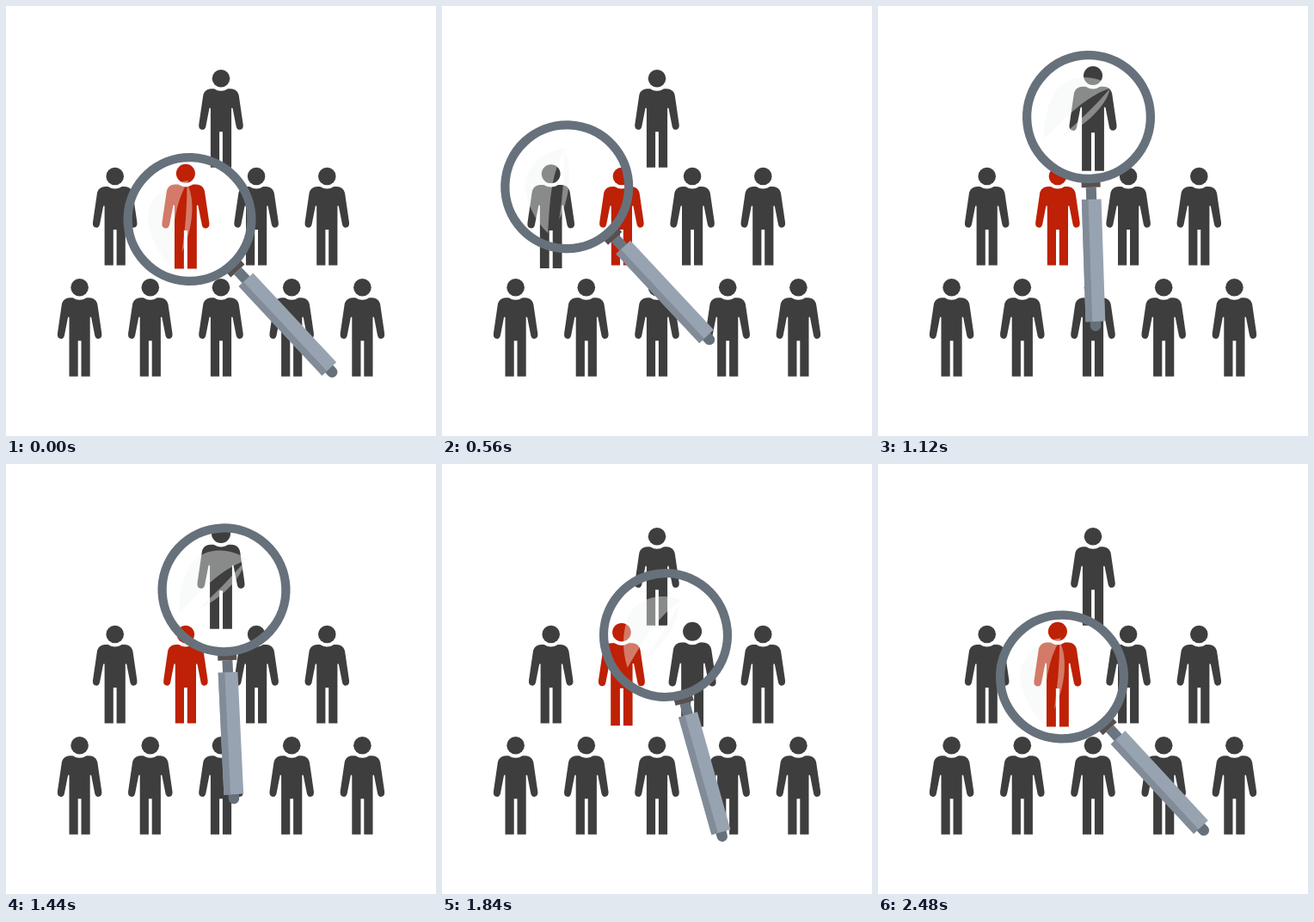
An HTML page for the animation above (2.52 s loop, 500 by 500 pixels).

```html
<!DOCTYPE html>
<html lang="en">
<head>
<meta charset="utf-8">
<title>Search</title>
<style>
html, body { margin: 0; width: 100%; height: 100%; overflow: hidden; background: #fff; }
svg { display: block; width: 100vw; height: 100vh; }
</style>
</head>
<body>
<svg viewBox="0 0 500 500">
  <defs>
    <g id="person">
      <circle r="10.3"/>
      <path d="M-8 12Q0 17 8 12H11.5C17 12.2 20 15.5 20.8 20L25.7 53.5Q26.3 58.8 22.4 59.6Q18.7 60.2 17.7 56L13.5 34.5H12.1V103.6H1.9V62H-1.9V103.6H-12.1V34.5H-13.5L-17.7 56Q-18.7 60.2-22.4 59.6Q-26.3 58.8-25.7 53.5L-20.8 20C-20 15.5-17 12.2-11.5 12Z"/>
    </g>
  </defs>
  <g id="crowd" fill="#3e3e3e"></g>
  <g id="lens">
    <g fill="#f1f5f3" fill-opacity=".42" transform="rotate(-47)">
      <path d="M-1-45C-30-42-49-22-49 0C-46 20-38 38-22 54C-20 16-18-20-1-45Z"/>
      <path d="M-3-41C7-24 4 12-9 38C-5 12-3-14-3-41Z"/>
    </g>
    <path fill="#6b757f" d="M82-6H98V6H82Z"/>
    <path fill="#574f50" d="M75-11H82V11H75Z"/>
    <path fill="#66707a" d="M236-6.2H243A6.2 6.2 0 0 1 243 6.2H236Z"/>
    <path fill="#98a3b2" d="M96-11.4H238V11.4H96Z"/>
    <path fill="#828c98" d="M96 3.7H238V11.4H96Z"/>
    <circle r="71.9" fill="none" stroke="#67717b" stroke-width="10.3"/>
  </g>
</svg>
<script>
const LOOP = 2520, STEP = 40, GAP = 82.2;
const ZOOM = 0.068, FADE = 280;

// Stops of the lens: arrival time, pose [x, y, angle], bow of the way there
const home = [213.5, 248, 47];
const stops = [
  { at: 580, pose: [145, 210, 47], bow: [0, 5, 0] },
  { at: 1120, pose: [245, 129, 88.1], bow: [0, -7, 1] },
  { from: 1240, at: 1840, pose: [260, 199, 74.3], bow: [6, -1, 3.6] },
  { at: LOOP, pose: home, bow: [0, 0, 0] }
];

const ease = u => {
  u = Math.min(1, Math.max(0, u));
  return u * u * (3 - 2 * u);
};

function lensPose(t) {
  const i = stops.findIndex(s => t < s.at);
  const { from, at, pose, bow } = stops[i];
  const prev = stops[i - 1] || { at: 0, pose: home };
  const start = from ?? prev.at;
  const p = ease((t - start) / (at - start));
  return pose.map((v, k) =>
    prev.pose[k] + (v - prev.pose[k]) * p + bow[k] * 4 * p * (1 - p));
}

// Grows a person around the middle of a visit, across the loop's seam
function visitScale({ mid, half }, t) {
  const d = Math.abs(t - mid);
  return 1 + ZOOM * ease((half - Math.min(d, LOOP - d)) / FADE);
}

const crowd = document.getElementById('crowd');
const lens = document.getElementById('lens');
const people = [];

function scalePerson({ el, x, y }, s) {
  el.setAttribute('transform', `translate(${x} ${y + 47}) scale(${s}) translate(0 -47)`);
}

function addRow(count, y, visits = []) {
  for (let i = 0; i < count; i++) {
    const el = document.createElementNS('http://www.w3.org/2000/svg', 'use');
    el.setAttribute('href', '#person');
    const person = { el, x: 250 + (i - (count - 1) / 2) * GAP, y, visit: visits[i] };
    if (person.visit?.fill) el.setAttribute('fill', person.visit.fill);
    scalePerson(person, 1);
    crowd.append(el);
    people.push(person);
  }
}

addRow(1, 84.2, [{ mid: 1280, half: 520 }]);
addRow(4, 198, [
  { mid: 480, half: 300 },
  { mid: 2240, half: 580, fill: '#be2105' },
  { mid: 1860, half: 340 }
]);
addRow(5, 327.2);

function draw(t) {
  const [x, y, angle] = lensPose(t);
  lens.setAttribute('transform', `translate(${x} ${y}) rotate(${angle})`);
  for (const p of people) if (p.visit) scalePerson(p, visitScale(p.visit, t));
}

const start = performance.now();
function tick(now) {
  const t = Math.max(0, now - start) % LOOP;
  draw(Math.floor(t / STEP) * STEP);
  requestAnimationFrame(tick);
}
draw(0);
requestAnimationFrame(tick);
</script>
</body>
</html>
```
